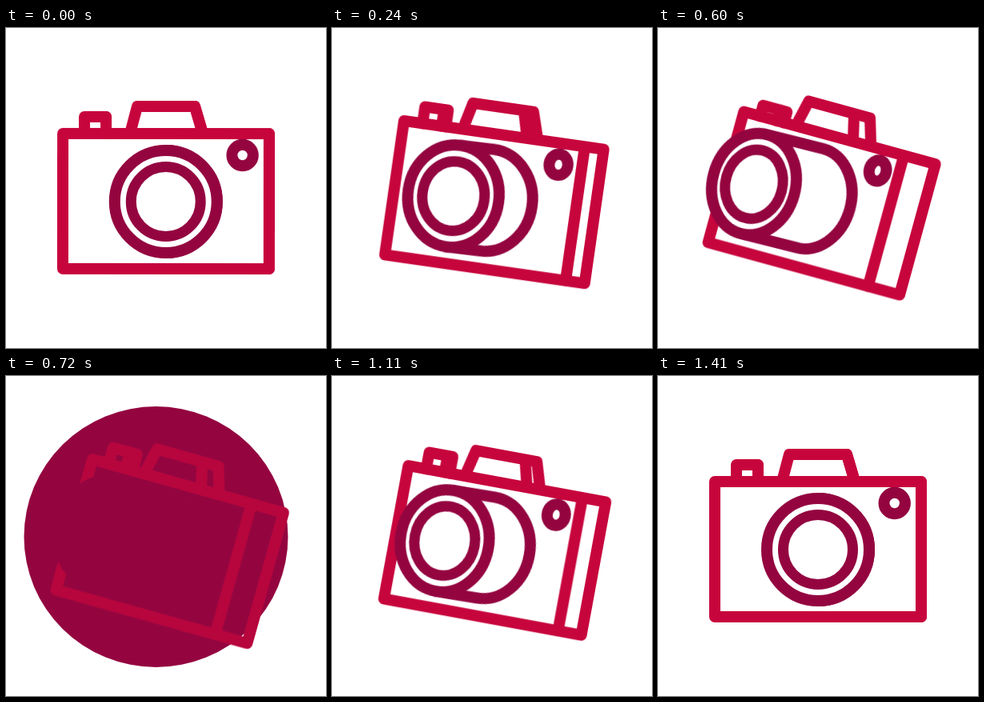
Animation, 400 px wide and 400 px high, one loop 1.47 s. Source, as an HTML page without scripts:

```html
<!DOCTYPE html>
<html lang="en">
<head>
<meta charset="utf-8">
<title>Camera</title>
<style>
  :root { --red: #c7053d; --plum: #940540; --loop: 1470ms linear infinite; }
  html, body { margin: 0; width: 100%; height: 100%; overflow: hidden; background: #fff; }
  svg { display: block; width: 100%; height: 100%; }

  path {
    d: var(--rest);
    fill: none;
    stroke-width: 14px;
    stroke-linejoin: round;
    stroke-linecap: round;
    animation: turn var(--loop);
  }
  .camera { transform-origin: 196px 217px; animation: tilt var(--loop); }
  .body { stroke: var(--red); animation: dim var(--loop); }
  .lens { stroke: var(--plum); fill: #fff; animation: fill var(--loop); }
  .lens .solid { fill: inherit; }
  .ring { stroke-width: 13px; }
  .press { transform-origin: 0 132px; animation: press var(--loop); }
  .press path { vector-effect: non-scaling-stroke; }
  .flash {
    fill: var(--plum);
    transform-origin: 187.5px 201px;
    animation: flash var(--loop);
  }

  /* --rest is the front view, --side the turned view */
  .front { --rest: path("M71 132H329V301H71Z"); --side: path("M81 132H287.5V301.5H81Z"); }
  .depth { --rest: path("M329 132H329V301H329"); --side: path("M287.5 132H329V301.5H287.5"); }
  .hump { --rest: path("M155 132L164 98L236 98L246 132"); --side: path("M148 132L155.5 98L214 98L222 132"); }
  .hump-depth { --rest: path("M236 98L236 98L246 132"); --side: path("M214 98L235 98L245.5 132"); }
  .button { --rest: path("M98 132V111H125V132"); --side: path("M102 132V111H124V132"); }
  .button-depth { --rest: path("M125 111H125V132"); --side: path("M124 111H133V132"); }
  .tube {
    --rest: path("M200 153L200 153A64 64 0 0 1 200 281L200 281");
    --side: path("M115.5 152L188.5 150.5A51.8 64 0 0 1 188.5 278.5L115.5 280");
  }
  .rim {
    --rest: path("M136 217a64 64 0 1 1 128 0a64 64 0 1 1 -128 0z");
    --side: path("M63.7 216a51.8 64 0 1 1 103.6 0a51.8 64 0 1 1 -103.6 0z");
  }
  .ring {
    --rest: path("M156.5 217a43.5 43.5 0 1 1 87 0a43.5 43.5 0 1 1 -87 0z");
    --side: path("M80 216a35.5 43.5 0 1 1 71 0a35.5 43.5 0 1 1 -71 0z");
  }
  .finder {
    --rest: path("M282.5 159a13.2 13.2 0 1 1 26.4 0a13.2 13.2 0 1 1 -26.4 0z");
    --side: path("M250.5 159a10.6 13.2 0 1 1 21.2 0a10.6 13.2 0 1 1 -21.2 0z");
  }

  @keyframes turn {
    0% { d: var(--rest); animation-timing-function: cubic-bezier(.333, .667, .667, 1); }
    46.94% { d: var(--side); }
    52.04% { d: var(--side); animation-timing-function: cubic-bezier(.333, 0, .667, .333); }
    95.92%, 100% { d: var(--rest); }
  }
  @keyframes tilt {
    0% { transform: rotate(0deg); animation-timing-function: cubic-bezier(.36, .56, .64, 1); }
    46.94% { transform: rotate(15.6deg); }
    52.04% { transform: rotate(15.6deg); animation-timing-function: cubic-bezier(.36, 0, .64, .44); }
    95.92%, 100% { transform: rotate(0deg); }
  }
  @keyframes press {
    0%, 32% { transform: none; }
    40%, 41.5% { transform: scaleY(.667); }
    48%, 100% { transform: none; }
  }
  @keyframes flash {
    0%, 43.8% { visibility: hidden; transform: scale(.45); }
    43.81% { visibility: visible; transform: scale(.45); }
    48%, 54% { visibility: visible; transform: none; }
    54.01%, 100% { visibility: hidden; transform: none; }
  }
  @keyframes fill {
    0%, 43.8%, 54.01%, 100% { fill: #fff; }
    43.81%, 54% { fill: var(--plum); }
  }
  @keyframes dim {
    0%, 43.8%, 54.01%, 100% { stroke: var(--red); }
    43.81%, 54% { stroke: #b7053d; }
  }
</style>
</head>
<body>
<svg viewBox="0 0 400 400">
  <ellipse class="flash" cx="187.5" cy="201" rx="165" ry="163"/>
  <g class="camera">
    <g class="body">
      <g class="press">
        <path class="button"/>
        <path class="button-depth"/>
      </g>
      <path class="hump"/>
      <path class="hump-depth"/>
      <path class="depth"/>
      <path class="front"/>
    </g>
    <g class="lens">
      <path class="finder"/>
      <path class="tube solid"/>
      <path class="rim solid"/>
      <path class="ring"/>
    </g>
  </g>
</svg>
</body>
</html>
```
